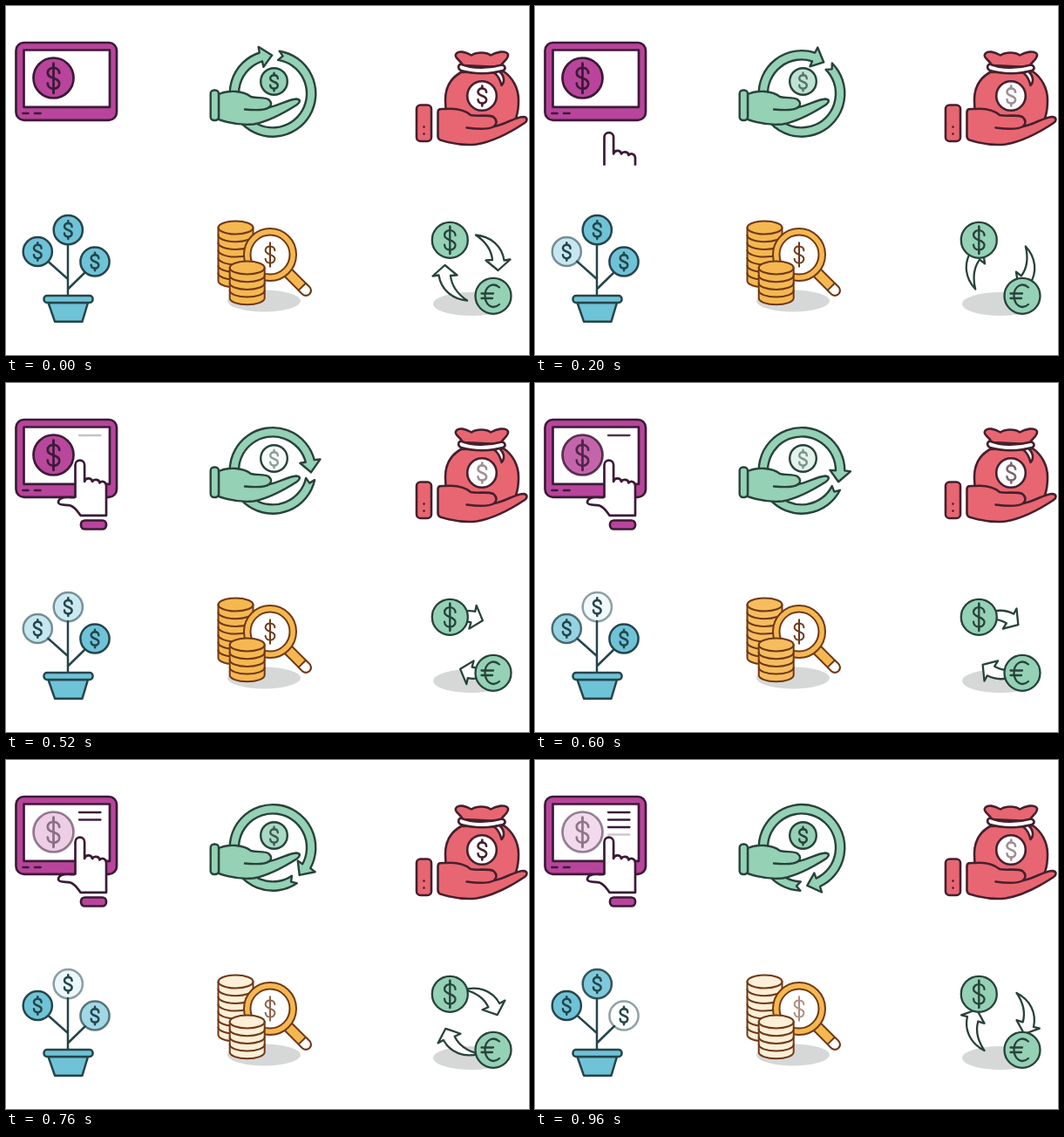
Animation, 600 px wide and 400 px high, one loop 1000 ms. Source, as an HTML page:

```html
<!DOCTYPE html>
<html lang="en">
<head>
<meta charset="utf-8">
<title>Finance icons</title>
<style>
html, body { margin: 0; width: 100%; height: 100%; overflow: hidden; background: #fff; }
svg { display: block; width: 600px; height: 400px; stroke-linecap: round; stroke-linejoin: round; }
.no { fill: none; }
.white { fill: #fff; }
.shade { fill: #d6d8d8; stroke: none; }
.sign path { vector-effect: non-scaling-stroke; }
</style>
</head>
<body>
<svg viewBox="0 0 600 400">
  <defs>
    <g id="small" class="no sign">
      <path d="M4.800-4.200C4.600-10-4.800-10-4.800-4.400C-4.800 1 4.800-1 4.800 4.400C4.800 10-4.600 10-4.800 4.200"/>
      <path d="M0-11.500V-8.600M0 8.600V11.500"/>
    </g>
    <g id="big" class="no sign"><use href="#small"/><path d="M0-12.200V12.200"/></g>
    <path id="swoop" d="M539 262.500C556 264 569 275 571.500 291.500L578.500 290.500L564.500 303L550.500 291.500L558 291C557 280 550 270 539 262.500Z"/>
    <clipPath id="below"><rect x="50" y="40" width="80" height="142.800"/></clipPath>
  </defs>

  <g fill="#b8459b" stroke="#3b1a38" stroke-width="2.700">
    <rect x="11.500" y="42" width="115.500" height="88.800" rx="9"/>
    <rect class="white" x="20.500" y="50.500" width="98.500" height="65.300"/>
    <path d="M19.500 123h6M33 123h6.500"/>
    <circle id="payCoin" cx="54.500" cy="82.500" r="23"/>
    <use id="paySign" href="#big" transform="translate(54.500 82.800) scale(1.400)"/>
    <g id="lines" stroke-width="2.300"></g>
    <g clip-path="url(#below)">
      <g id="finger">
        <path class="white" d="M79.500 130.500V94a5.300 5.300 0 0 1 10.600 0V113C91 108.500 98 108 99 113C101 109.500 107 110.500 107.500 114.500C110 111.500 115 113 115 118V151.800H85.500C82 147 79.500 142.500 74 140.500C70 139 61 141 60 137C60 132 67 131 71 131C75 131 77 132 79.500 130.500Z"/>
        <rect x="86" y="157.500" width="29" height="10" rx="4.500"/>
      </g>
    </g>
  </g>

  <g fill="#94d1b5" stroke="#28423a" stroke-width="2.400">
    <path id="ring"/>
    <circle id="handCoin" cx="307.500" cy="86.500" r="15.300"/>
    <use id="handSign" href="#small" transform="translate(307.500 87) scale(.9)"/>
    <path d="M244 101C256 96 272 97 281 104C288 106 296 104 301 107C306 111 304 114 302 116C313 114 324 107 333 106.500C338 107 338 110 334 113C320 122 303 132 284 135.500C268 137 255 134 244 130Z"/>
    <path class="no" d="M302 116C298 119.500 285 119.500 274 118.500"/>
    <rect x="234.700" y="96.500" width="9.300" height="34.500" rx="4"/>
  </g>

  <g fill="#e86672" stroke="#45202d" stroke-width="2.600">
    <path d="M522 76C511 82 504 93 504 108C504 122 508 134 514 140H578C585 133 588 120 588 108C588 94 581 82 571 75Z"/>
    <path d="M524 68C522 62 514 60 516 55.500C519 50 528 53 534 56.500C540 52.500 551 52.500 556 56.500C562 53 573 50 576 55.500C577 61 569 64 567 70Z"/>
    <path class="white" d="M521.500 66.500C535 72 553 72 569 67.500C573 68.500 574 72.500 570 74C555 78.500 536 78 522 74C518 72 518.500 68 521.500 66.500Z"/>
    <path class="white" d="M560 76.500C565 80 567 85 568.500 91C573 86 571 79 566 75Z"/>
    <circle class="white" cx="546" cy="103" r="16.800"/>
    <use id="bagSign" href="#small" transform="translate(546.300 103)"/>
    <path d="M495.500 122C495.500 117 500 118 505 118C518 117 526 119 533 125C541 127 552 124 559 127C564 131 563 135 560 138C573 136 584 127 594 127C599 128 598 132 595 134C580 144 561 155 540 158.500C524 160.500 509 157 498 153.500Q495.500 152 495.500 149Z"/>
    <path class="no" d="M560 138C554 141.500 540 141 528.500 139.500"/>
    <rect x="471" y="113.500" width="17" height="41.500" rx="4.500"/>
    <path d="M479.500 138.500v.1M479.500 146.500v.1"/>
  </g>

  <g fill="#6fc3d7" stroke="#25454b" stroke-width="2.500">
    <path class="no" d="M71 273V332M48 292.500L71 313M91 305L71 324.500"/>
    <g id="leaves"></g>
    <path d="M48.500 340H94L87.500 361.700H56Z"/>
    <rect x="43.500" y="332" width="56" height="8" rx="3.500"/>
  </g>

  <g fill="#f5b850" stroke="#703817" stroke-width="2">
    <ellipse class="shade" cx="296" cy="338" rx="42" ry="12.500"/>
    <g id="backStack"></g>
    <g transform="translate(303 285) rotate(45)">
      <path d="M27-5.800H58a5.800 5.800 0 0 1 0 11.600H27Z"/>
      <path class="white" d="M52-5.800H58a5.800 5.800 0 0 1 0 11.600H52Z"/>
    </g>
    <circle cx="303" cy="285" r="30"/>
    <circle class="white" cx="303" cy="285" r="22.500"/>
    <use id="lensSign" href="#big" transform="translate(303 285) scale(1.120)"/>
    <g id="frontStack"></g>
  </g>

  <g fill="#94d1b5" stroke="#28423a" stroke-width="2.300">
    <ellipse class="shade" cx="534" cy="341.500" rx="44" ry="13.500"/>
    <g id="swap" class="white">
      <use href="#swoop"/>
      <use href="#swoop" transform="rotate(180 534 300)"/>
    </g>
    <circle cx="509.300" cy="268.300" r="20.500"/>
    <use href="#big" transform="translate(509.300 268.300) scale(1.300)"/>
    <circle cx="559" cy="332.300" r="20.500"/>
    <path class="no" d="M566 322.500C558 315.500 549.500 322 549.500 332C549.500 342.500 558 349 566 342M545.500 329.500H559M545.500 335H558"/>
  </g>
</svg>
<script>
const LOOP = 1000, STEP = 40;
const $ = id => document.getElementById(id);
const clamp = v => Math.min(1, Math.max(0, v));

// Eases from 1 down to 0 at mid and back up, reaching 1 at a distance of half.
const dip = (t, mid, half) => (1 - Math.cos(Math.PI * clamp(Math.abs(t - mid) / half))) / 2;

function set(el, attrs) {
  for (const name in attrs) el.setAttribute(name, attrs[name]);
}

// Coins of the plant, in the order in which they fade.
const leaves = [[36.3, 281.5], [71.3, 256.7], [102, 293]];
$('leaves').innerHTML = leaves.map(([x, y]) =>
  `<circle cx="${x}" cy="${y}" r="16.600"/>` +
  `<use href="#small" transform="translate(${x} ${y}) scale(.9)"/>`).join('');
const leafDots = $('leaves').querySelectorAll('circle');

for (let i = 0; i < 4; i++)
  $('lines').innerHTML += `<path d="M84 ${60 + 8.5 * i}H108.500"/>`;
const lineMarks = [...$('lines').children];

function stack(id, x, y, count) {
  const gap = 8.7;
  const arc = 'a20 7.5 0 0 0 40 0';
  const body = `M${x} ${y}v${gap * count}${arc}V${y}a20 7.5 0 0 0 -40 0`;
  let rims = '';
  for (let i = 0; i < count; i++) rims += `M${x} ${y + gap * i}${arc}`;
  $(id).innerHTML = `<path class="white" stroke="none" d="${body}"/>` +
    `<path class="tint" d="${body}"/><path class="no" d="${rims}"/>`;
}
stack('backStack', 243.5, 254, 7);
stack('frontStack', 256.7, 300, 4);
const stackFills = document.querySelectorAll('.tint');

// Ring arrow with its tip at angle 0.
const polar = (deg, r) => {
  const a = deg * Math.PI / 180;
  return `${306 + r * Math.cos(a)} ${100.4 + r * Math.sin(a)}`;
};
set($('ring'), {
  d: `M${polar(10, 49.3)}A49.3 49.3 0 1 1 ${polar(-17, 49.3)}L${polar(-16, 56)}L${polar(0, 44)}` +
    `L${polar(-18, 32.5)}L${polar(-17, 39)}A39 39 0 1 0 ${polar(10, 39)}L${polar(16, 44.5)}Z`
});

// The outline of a fading coin never drops below half strength.
const outline = v => .5 + .5 * v * v;

function draw(t) {
  const pay = .08 + .92 * dip(t, 870, 380);
  set($('payCoin'), { 'fill-opacity': pay, 'stroke-opacity': outline(pay) });
  set($('paySign'), { opacity: outline(pay) });
  set($('finger'), { transform: `translate(0 ${Math.max(0, 96.5 - .2 * t)})` });
  lineMarks.forEach((el, i) => set(el, { opacity: clamp((t - 485 - 148 * i) / 130) }));

  const hand = dip(t, 450, 440);
  set($('ring'), { transform: `rotate(${-91 + .18 * t} 306 100.4)` });
  set($('handCoin'), { 'fill-opacity': hand });
  set($('handSign'), { opacity: outline(hand) });

  set($('bagSign'), { opacity: .5 + .5 * clamp(Math.cos(2 * Math.PI * t / 740)) });

  leafDots.forEach((el, i) => {
    const v = dip(t, 360 + 310 * i, 370);
    set(el, { 'fill-opacity': v, 'stroke-opacity': outline(v) });
  });

  stackFills.forEach(el => set(el, { 'fill-opacity': dip(t, 860, 320) }));
  set($('lensSign'), { opacity: .5 + .5 * dip(t, 900, 260) });

  set($('swap'), { transform: `rotate(${.21 * t} 534 300)` });
}

const start = performance.now();
function tick() {
  const t = (performance.now() - start) % LOOP;
  draw(Math.floor(t / STEP) * STEP);
  requestAnimationFrame(tick);
}
draw(0);
requestAnimationFrame(tick);
</script>
</body>
</html>
```
